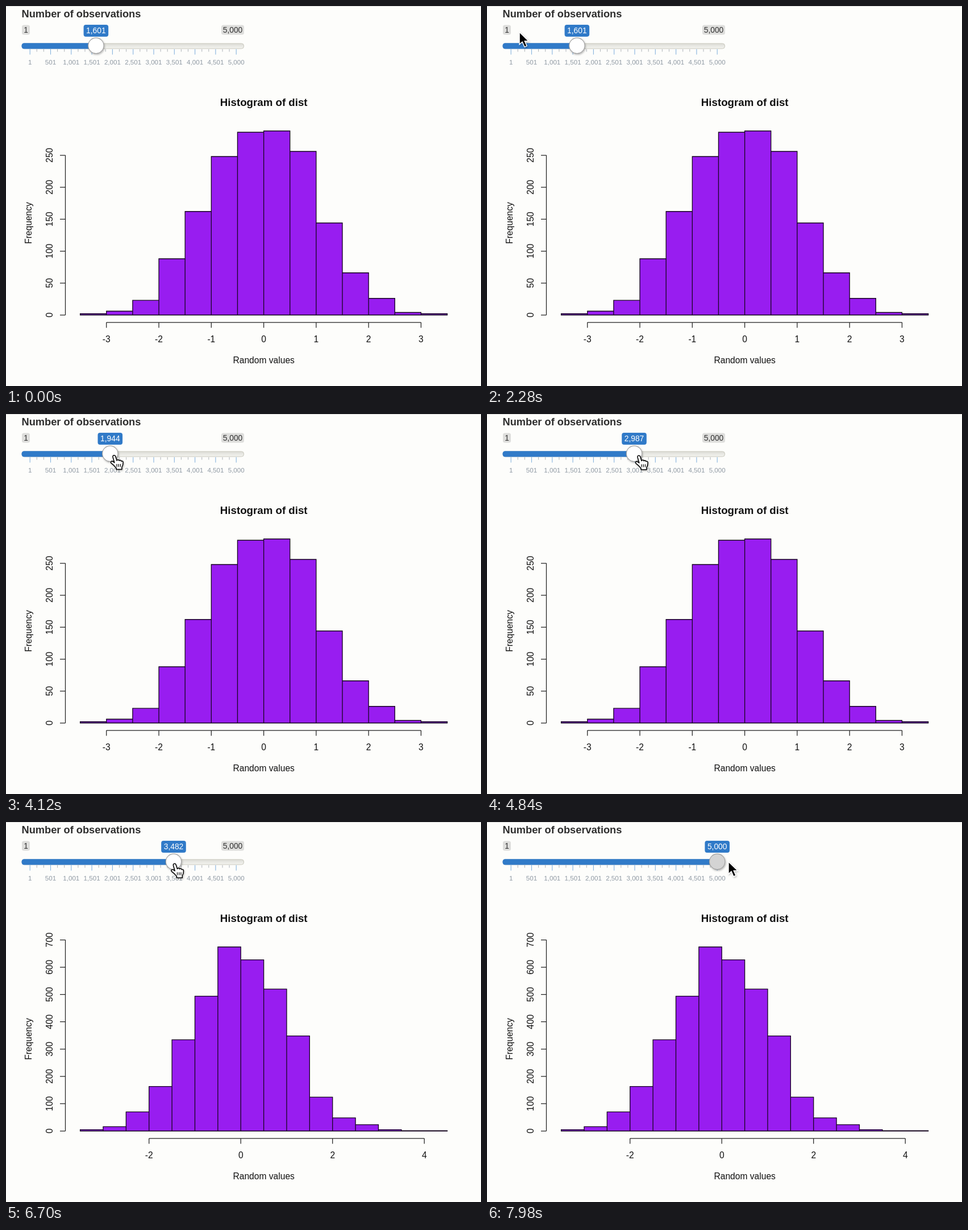
An HTML page that plays this animation: 836x669 px, repeating every 8 s.

```html
<!DOCTYPE html>
<html lang="en">
<head>
<meta charset="utf-8">
<title>Histogram slider</title>
<style>
  html, body { margin: 0; width: 100%; height: 100%; overflow: hidden; background: #fdfdfb; }
  svg { display: block; width: 100%; height: 100%; font-family: "Liberation Sans", Arial, sans-serif; }
  .mid { text-anchor: middle; }
  .plot { font-size: 15.6px; fill: #111; }
  .axis { fill: none; stroke: #222; stroke-width: 1.25; }
  .bars { fill: #981df0; stroke: #16051f; stroke-width: 1.3; }
  .tag { font-size: 13.8px; fill: #333; }
</style>
</head>
<body>
<svg id="stage" viewBox="0 0 836 669">
  <defs>
    <linearGradient id="rail" x2="0" y2="1">
      <stop offset="0" stop-color="#dcdcd6"/><stop offset="1" stop-color="#f4f4f0"/>
    </linearGradient>
    <filter id="soft" x="-40%" y="-40%" width="180%" height="180%">
      <feDropShadow dx="1" dy="1.5" stdDeviation="1.4" flood-opacity=".3"/>
    </filter>
  </defs>
  <rect width="836" height="669" fill="#fdfdfb"/>
  <path d="M0 .5H836" stroke="#dcdcda"/>
  <text x="27.5" y="20" font-size="18.25" font-weight="bold" fill="#2e2e2e">Number of observations</text>

  <rect x="28" y="33.5" width="14" height="17" rx="3.5" fill="#dededc"/>
  <text class="tag mid" x="35" y="47">1</text>
  <g id="maxTag">
    <rect x="379" y="33.5" width="40" height="17" rx="3.5" fill="#dededc"/>
    <text class="tag mid" x="399" y="47">5,000</text>
  </g>
  <rect x="28" y="66" width="390.5" height="9" rx="4" fill="url(#rail)" stroke="#c9c8bd"/>
  <rect id="fill" x="27.5" y="65.3" height="10.2" rx="4.5" fill="#307ac8"/>
  <g id="ticks"></g>
  <g id="bubble">
    <rect x="-21.8" y="33" width="43.6" height="21" rx="4" fill="#307ac8"/>
    <text id="value" class="mid" y="48.3" font-size="13.8" fill="#fff"></text>
  </g>
  <circle id="knob" cy="69.8" r="13.7" stroke="#a3a3a3" stroke-width="1.2" filter="url(#soft)"/>

  <g class="plot">
    <text class="mid" x="453.7" y="176" font-size="18.7" font-weight="bold">Histogram of dist</text>
    <text class="mid" x="453.7" y="629">Random values</text>
    <text class="mid" transform="translate(45 382) rotate(-90)">Frequency</text>
    <g id="before"></g>
    <g id="after"></g>
  </g>

  <path id="arrow" filter="url(#soft)" d="M0 0V21.5L5 17L9 26L13 24.2L9.2 15.6H16Z"
        fill="#000" stroke="#fff" stroke-width="1.4"/>
  <g id="hand" filter="url(#soft)" stroke="#000" stroke-width="1.5" stroke-linejoin="round">
    <path fill="#fff" d="M-2 3C-3 -.4 1.4 -1.6 2.6 1.6L5 9C6 7 8.6 7.2 9 9.2C10.4 7.6 12.4 8.4 12.8 10.2
      C14.6 9.2 16.2 10.4 16 12.6C16 16 15.4 18.4 13.8 20.6V24.6H4V22C1.6 19.4 -.6 16.6 -4.8 13.6
      C-7 11.6 -4.4 9.2 -2 10.6L.8 12.6Z"/>
    <path fill="none" stroke-width="1.2" d="M5 15V20M8.2 15V20M11.4 15V20"/>
  </g>
</svg>
<script>
const LOOP = 8000, REDRAW = 5640, RELEASE = 7700;
const $ = id => document.getElementById(id);
const commas = n => n.toLocaleString('en-US');

const RAIL = { left: 42.2, right: 405.2, min: 1, max: 5000 };
const toX = v => RAIL.left + (v - RAIL.min) / (RAIL.max - RAIL.min) * (RAIL.right - RAIL.left);

// [time, value...] keys
const valueKeys = [[3700, 1601], [4120, 1943], [4840, 2986], [5300, 3453],
  [6600, 3453], [7160, 4046], [7560, 5000]];
const cursorKeys = [[2040, 40, -30], [2280, 57, 46], [2950, 155, 73], [3640, 155, 73],
  [4120, 190, 73], [4840, 267, 73.5], [5250, 290, 73.5], [6540, 290, 73.5],
  [7160, 351, 74], [7600, 419, 72], [7850, 425, 70]];

// Monotone cubic interpolation of column c
function track(keys, c, t) {
  const last = keys.length - 1;
  if (t <= keys[0][0]) return keys[0][c];
  if (t >= keys[last][0]) return keys[last][c];
  const i = keys.findIndex(k => k[0] > t) - 1;
  const rate = j => (keys[j + 1][c] - keys[j][c]) / (keys[j + 1][0] - keys[j][0]);
  const slope = j => {
    if (j === 0 || j === last) return 0;
    const a = rate(j - 1), b = rate(j);
    return a * b <= 0 ? 0 : 2 * a * b / (a + b);
  };
  const [a, b] = [keys[i], keys[i + 1]];
  const h = b[0] - a[0], u = (t - a[0]) / h, v = 1 - u;
  return a[c] * (1 + 2 * u) * v * v + b[c] * u * u * (3 - 2 * u)
    + h * u * v * (slope(i) * v - slope(i + 1) * u);
}

function drawTicks() {
  let out = '';
  const step = (RAIL.right - RAIL.left) / 30;
  for (let i = 0; i <= 30; i++) {
    const x = RAIL.left + i * step, major = i % 3 === 0;
    out += `<path d="M${x} 76V${major ? 85.5 : 80.5}" stroke="${major ? '#86b3de' : '#b4b9bd'}" stroke-width="1.1"/>`;
    if (major) {
      const n = i === 30 ? 5000 : 1 + i / 3 * 500;
      out += `<text class="mid" x="${x}" y="103" font-size="11.6" fill="#8f99a3">${commas(n)}</text>`;
    }
  }
  $('ticks').innerHTML = out;
}

// Bins are half a unit wide, starting at -3.5
function drawHistogram(id, counts, yStep, yMax, xTicks) {
  const left = 130.6, right = 776.6, base = 544;
  const w = (right - left) / counts.length, scale = 324 / Math.max(...counts);
  const px = v => left + (v + 3.5) * 2 * w, py = n => base - n * scale;
  const bars = counts.map((n, i) => `M${left + i * w} ${base}V${py(n)}h${w}V${base}Z`).join('');
  let axis = `M104.5 ${base}V${py(yMax)}M${px(xTicks[0])} 557H${px(xTicks[xTicks.length - 1])}`, labels = '';
  for (let n = 0; n <= yMax; n += yStep) {
    axis += `M104.5 ${py(n)}H95`;
    labels += `<text class="mid" transform="translate(82 ${py(n)}) rotate(-90)">${n}</text>`;
  }
  for (const v of xTicks) {
    axis += `M${px(v)} 557V566.5`;
    labels += `<text class="mid" x="${px(v)}" y="591.5">${v}</text>`;
  }
  $(id).innerHTML = `<path class="bars" d="${bars}"/><path class="axis" d="${axis}"/>${labels}`;
}

const show = (id, on) => $(id).setAttribute('display', on ? 'inline' : 'none');

function render(t) {
  const value = Math.round(track(valueKeys, 1, t)), x = toX(value);
  $('fill').setAttribute('width', x - 27.5);
  $('knob').setAttribute('cx', x);
  $('knob').setAttribute('fill', t < RELEASE ? '#fff' : '#d4d4d4');
  $('bubble').setAttribute('transform', `translate(${x} 0)`);
  $('value').textContent = commas(value);
  show('maxTag', x + 22 < 375);

  show('before', t < REDRAW);
  show('after', t >= REDRAW);

  const pos = `translate(${track(cursorKeys, 1, t)} ${track(cursorKeys, 2, t)})`;
  const grabbing = t >= 2880 && t < RELEASE;
  $('arrow').setAttribute('transform', pos);
  $('hand').setAttribute('transform', pos);
  show('arrow', t > 2040 && !grabbing);
  show('hand', grabbing);
}

drawTicks();
drawHistogram('before', [2, 6, 23, 88, 162, 248, 286, 288, 256, 144, 66, 26, 4, 2],
  50, 250, [-3, -2, -1, 0, 1, 2, 3]);
drawHistogram('after', [5, 16, 70, 163, 334, 494, 674, 627, 520, 348, 124, 48, 23, 5, 1, 1],
  100, 700, [-2, 0, 2, 4]);

const start = performance.now();
function tick() {
  render((performance.now() - start) % LOOP);
  requestAnimationFrame(tick);
}
render(0);
requestAnimationFrame(tick);
</script>
</body>
</html>
```
